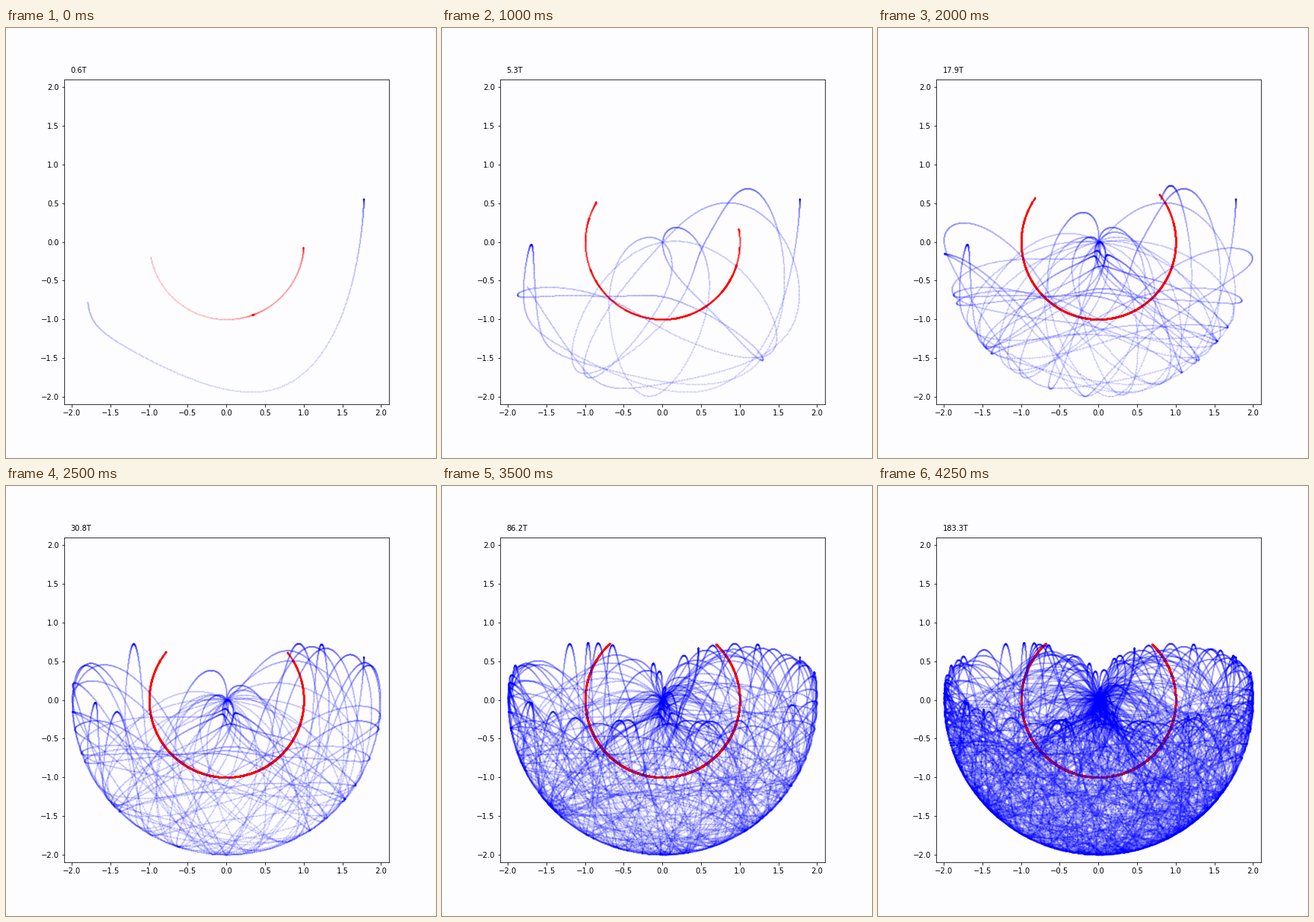
Animation of 576x576 px, one loop 4500 ms. Source, as a matplotlib script:

```python
from math import sin, cos, pi

import numpy as np
import matplotlib.pyplot as plt
from matplotlib.animation import FuncAnimation

FRAMES, INTERVAL = 18, 250
STEPS_PER_PERIOD = 1000
START = (1.5, 2.25)  # arm angles from straight down, both at rest


def elapsed(frame):
    """Simulated time at a frame, in periods of a single arm."""
    return 2.79098 * 1.28 ** frame - 2.2


def accelerations(a, b, va, vb):
    """Double pendulum with equal arms and masses, in units of sqrt(l/g)."""
    s, c = sin(a - b), cos(a - b)
    p = -s * vb * vb - 2 * sin(a)
    q = s * va * va - sin(b)
    det = 2 - c * c
    return (p - c * q) / det, (2 * q - c * p) / det


def simulate(count):
    h = 2 * pi / STEPS_PER_PERIOD
    k = h / 2
    a, b = START
    va = vb = 0.0
    angles = np.empty((count, 2))
    for i in range(count):
        angles[i] = a, b
        # Runge-Kutta, fourth order
        a1, b1 = accelerations(a, b, va, vb)
        va2, vb2 = va + k * a1, vb + k * b1
        a2, b2 = accelerations(a + k * va, b + k * vb, va2, vb2)
        va3, vb3 = va + k * a2, vb + k * b2
        a3, b3 = accelerations(a + k * va2, b + k * vb2, va3, vb3)
        va4, vb4 = va + h * a3, vb + h * b3
        a4, b4 = accelerations(a + h * va3, b + h * vb3, va4, vb4)
        a += h / 6 * (va + 2 * va2 + 2 * va3 + va4)
        b += h / 6 * (vb + 2 * vb2 + 2 * vb3 + vb4)
        va += h / 6 * (a1 + 2 * a2 + 2 * a3 + a4)
        vb += h / 6 * (b1 + 2 * b2 + 2 * b3 + b4)
    return angles.T


def steps_until(frame):
    return int(elapsed(frame) * STEPS_PER_PERIOD)


theta1, theta2 = simulate(steps_until(FRAMES - 1))
x1, y1 = np.sin(theta1), -np.cos(theta1)
x2, y2 = x1 + np.sin(theta2), y1 - np.cos(theta2)

plt.rcParams.update({"font.family": "DejaVu Sans", "font.size": 10})
fig = plt.figure(figsize=(8, 8), dpi=72, facecolor="#fdfdff")
ax = fig.add_axes([0.135, 0.125, 0.755, 0.755], facecolor="#fdfdff")
ax.set(xlim=(-2.1, 2.1), ylim=(-2.1, 2.1))
ticks = np.arange(-2, 2.1, 0.5)
ax.set_xticks(ticks)
ax.set_yticks(ticks)

dots = dict(ls="none", marker="o", ms=2, mew=0, alpha=0.14)
inner, = ax.plot([], [], color="red", **dots)
outer, = ax.plot([], [], color="blue", **dots)
clock = ax.text(0.02, 1.02, "", transform=ax.transAxes)


def update(frame):
    n = steps_until(frame)
    inner.set_data(x1[:n], y1[:n])
    outer.set_data(x2[:n], y2[:n])
    clock.set_text(f"{elapsed(frame):.1f}T")
    return inner, outer, clock


anim = FuncAnimation(fig, update, frames=FRAMES, interval=INTERVAL,
                     repeat=True, repeat_delay=0)
plt.show()
```
